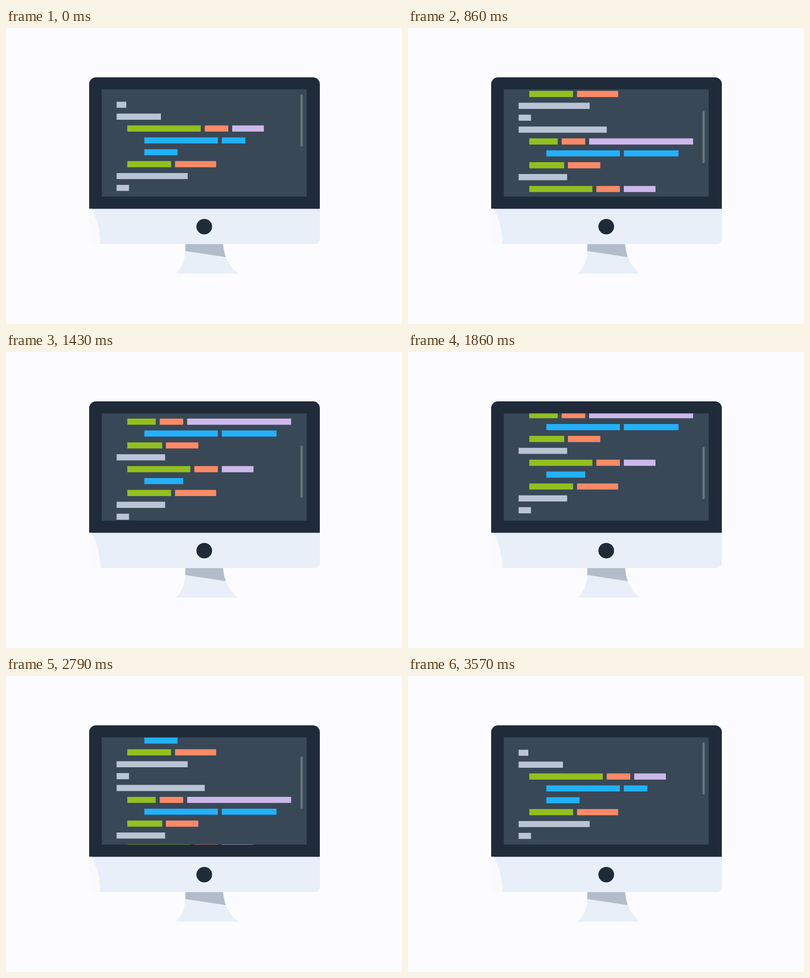
Write an HTML page with a canvas that moves like this. It is 800 px wide and 600 px high and loops after 3640 ms.

```html
<!DOCTYPE html>
<html lang="en">
<head>
<meta charset="utf-8">
<title>Scrolling code</title>
<style>
html, body { margin: 0; width: 100%; height: 100%; overflow: hidden; background: #fcfcfe; }
canvas { display: block; }
</style>
</head>
<body>
<canvas id="stage" width="800" height="600"></canvas>
<script>
const ctx = document.getElementById('stage').getContext('2d');

const LOOP = 3640, STEPS = 51, TURN = 25;
const EASE_START = 4.55, EASE_LENGTH = 22.3;
const SCROLL = 246.5, THUMB_RATIO = 0.2377;
const LINE_TOP = 149.4, LINE_GAP = 24.08, BAR_HEIGHT = 12.4;

const COLORS = {
  w: '#b9c4d4', g: '#93c01f', o: '#fd8a66', l: '#cdb8ea', b: '#22b1fb',
  page: '#fcfcfe', bezel: '#202b3a', screen: '#394857',
  shell: '#e9eff8', glare: '#fafafa', shadow: '#b3bcca', thumb: '#68757f'
};

// Each bar: colour key, left, right.
const LINES = [
  [['w', 223.5, 243]],
  [['w', 223.5, 313]],
  [['g', 245, 393.5], ['o', 401.5, 449], ['l', 457, 521]],
  [['b', 279.5, 428], ['b', 436, 483.5]],
  [['b', 279.5, 346.5]],
  [['g', 245, 333.5], ['o', 341.5, 424.5]],
  [['w', 223.5, 367]],
  [['w', 223.5, 248.5]],
  [['w', 223.5, 401.5]],
  [['g', 245, 302.5], ['o', 310.5, 358], ['l', 366, 576]],
  [['b', 279.5, 428], ['b', 436, 546.5]],
  [['g', 245, 315.5], ['o', 323, 388.5]],
  [['w', 223.5, 321.5]],
  [['g', 245, 372.5], ['o', 380.5, 428], ['l', 436, 500]],
  [['b', 279.5, 358]],
  [['g', 245, 333.5], ['o', 341.5, 424.5]],
  [['w', 223.5, 321.5]],
  [['w', 223.5, 248.5]]
];

// Cubic bezier easing (.25, .1, .25, 1), solved by bisection.
function ease(x) {
  if (x <= 0) return 0;
  if (x >= 1) return 1;
  let low = 0, high = 1;
  for (let i = 0; i < 30; i++) {
    const s = (low + high) / 2;
    if (0.75 * s * (1 - s) + s ** 3 < x) low = s; else high = s;
  }
  const s = low, r = 1 - s;
  return 0.3 * s * r * r + 3 * s * s * r + s ** 3;
}

function scrollAt(ms) {
  const step = Math.floor(((ms % LOOP) + 5) / (LOOP / STEPS)) % STEPS;
  const mirrored = TURN - Math.abs(step - TURN);
  return SCROLL * ease((mirrored - EASE_START) / EASE_LENGTH);
}

function rect(color, x, y, w, h, radius = 0) {
  ctx.fillStyle = color;
  ctx.beginPath();
  ctx.roundRect(x, y, w, h, radius);
  ctx.fill();
}

function fillPath(color, path) {
  ctx.fillStyle = color;
  ctx.fill(new Path2D(path));
}

function drawStand() {
  fillPath(COLORS.shell, 'M362 437 V452 C361 474 354 488 343 498 H469 C455 487 440 466 438.5 437 Z');
  fillPath(COLORS.shadow, 'M362.5 437 H438.5 Q439.5 452 444 464.5 L362 452 Z');
}

function drawBody() {
  rect(COLORS.bezel, 168, 100, 466, 280, [14, 14, 0, 0]);
  rect(COLORS.shell, 168, 366.5, 466, 71.5, [0, 0, 11, 11]);
  fillPath(COLORS.glare, 'M168 366.5 H173 Q189 395 191 438 H179 Q168 438 168 427 Z');
  ctx.fillStyle = COLORS.bezel;
  ctx.beginPath();
  ctx.arc(400.5, 402.7, 15.8, 0, Math.PI * 2);
  ctx.fill();
}

function drawScreen(scroll) {
  ctx.save();
  ctx.beginPath();
  ctx.rect(193.5, 124.5, 414, 217.3);
  ctx.clip();
  rect(COLORS.screen, 190, 120, 420, 225);
  LINES.forEach((bars, i) => {
    const y = LINE_TOP + i * LINE_GAP - scroll;
    for (const [key, left, right] of bars) rect(COLORS[key], left, y, right - left, BAR_HEIGHT);
  });
  rect(COLORS.thumb, 595, 134.5 + scroll * THUMB_RATIO, 4.5, 105.7, 2);
  ctx.restore();
}

function draw(ms) {
  rect(COLORS.page, 0, 0, 800, 600);
  drawStand();
  drawBody();
  drawScreen(scrollAt(ms));
}

const start = performance.now();
function tick() {
  draw(performance.now() - start);
  requestAnimationFrame(tick);
}
tick();
</script>
</body>
</html>
```
